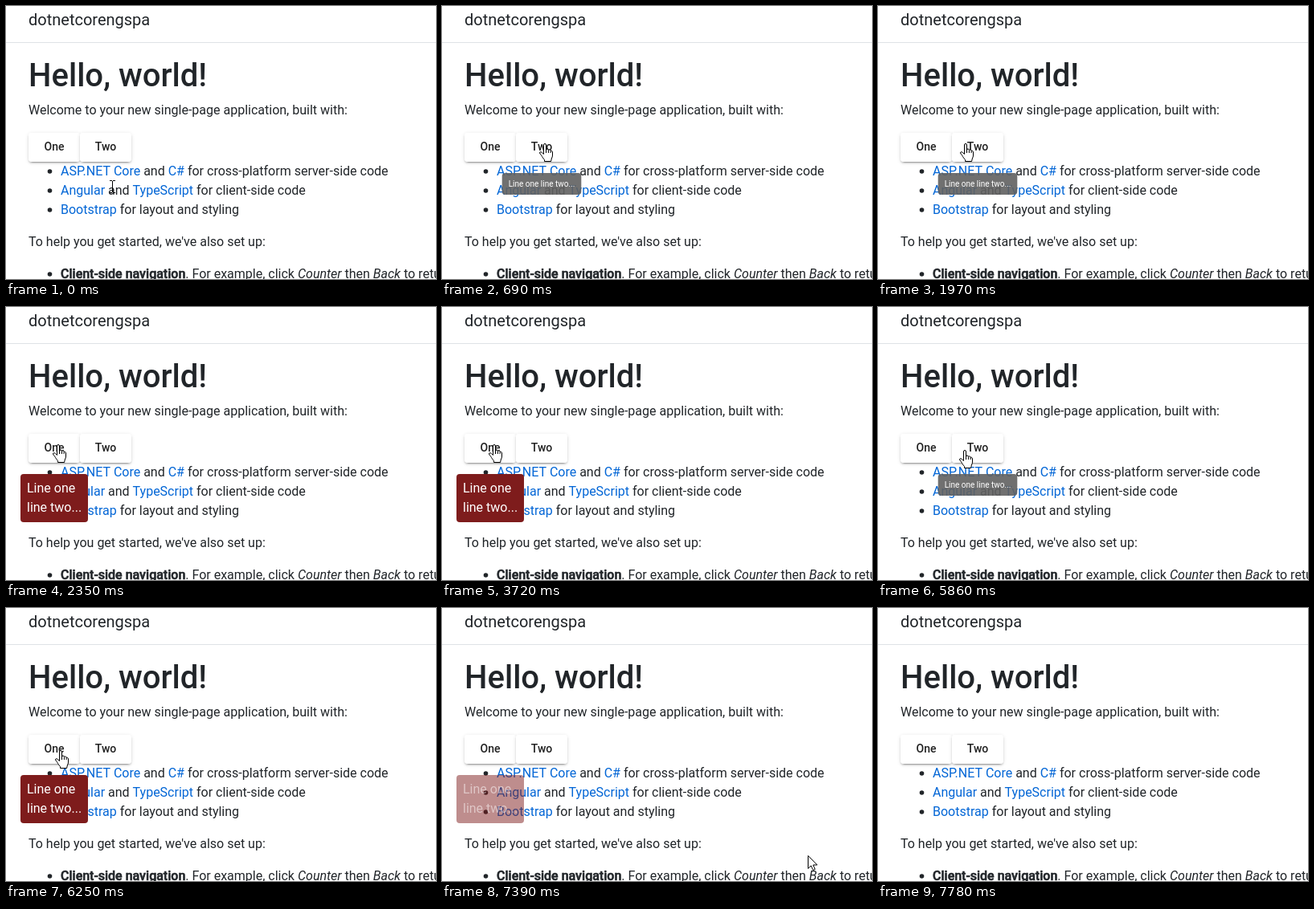
An HTML page with a canvas for the animation above (8.4 s loop, 535x340 px).

```html
<!DOCTYPE html>
<html lang="en">
<head>
<meta charset="utf-8">
<title>Tooltip demo</title>
<style>
  html, body { margin: 0; width: 100%; height: 100%; overflow: hidden; background: #fff; }
  canvas { display: block; }
</style>
</head>
<body>
<canvas id="stage" width="535" height="340"></canvas>
<script>
const ctx = document.getElementById('stage').getContext('2d');
const LOOP = 8400;
const INK = '#212529', LINK = '#0366d6', LINK_HOVER = '#0056b3';

// time, cursor kind, cursor left, cursor top, tooltip, tooltip opacity
const STEPS = [
  [0, 'beam', 128, 217],
  [120, 'hand', 126, 203],
  [270, 'hand', 123, 189],
  [390, 'hand', 122, 188, 'grey', 0.5],
  [540, 'hand', 121, 180, 'grey', 1],
  [690, 'hand', 121, 171, 'grey', 1],
  [1970, 'hand', 102, 171, 'grey', 1],
  [2090, 'hand', 86, 171, 'grey', 0.5],
  [2210, 'hand', 72, 171, 'red', 0.5],
  [2350, 'hand', 58, 171, 'red', 1],
  [2470, 'hand', 49, 171, 'red', 1],
  [3720, 'hand', 58, 171, 'red', 1],
  [3850, 'hand', 68, 170, 'red', 1],
  [3970, 'hand', 79, 170, 'red', 1],
  [4120, 'hand', 95, 173, 'red', 0.5],
  [4240, 'hand', 107, 176, 'grey', 0.5],
  [4360, 'hand', 114, 178, 'grey', 1],
  [5860, 'hand', 101, 178, 'grey', 1],
  [5980, 'hand', 86, 177, 'grey', 1],
  [6120, 'hand', 70, 177, 'red', 0.5],
  [6250, 'hand', 61, 177, 'red', 1],
  [7390, 'arrow', 455, 308, 'red', 0.5],
  [7540, 'beam', 489, 322],
  [7660, 'none', 0, 0]
];

const TIPS = {
  grey: { x: 74.7, w: 98.6, h: 27, fill: 'rgba(97,97,97,.9)', size: 10, base: 225, lines: ['Line one line two...'] },
  red: { x: 18, w: 84, h: 60, fill: '#7e1c1c', size: 16, base: 231, lines: ['Line one', 'line two...'] }
};

const HAND = new Path2D('M5.5 13.5V2Q5.5.5 7 .5T8.5 2V8Q8.7 7 10 7T11.4 8.4Q11.7 7.7 12.8 7.9T14.1 9.5' +
  'Q14.4 9 15.3 9.2T16.5 11V15Q16.5 17 15.3 19L14.6 22.5H6.5V20.5Q5 19 3.5 16.5Q2.5 14.5 1 13' +
  'Q0 11.8.9 11Q2 10.2 3.5 11.5Z');
const KNUCKLES = new Path2D('M8.5 7.5V12M11.4 8.4V12M14.1 9.5V12');
const ARROW = new Path2D('M.5.5V16.5L4.2 13L6.7 18.5L9.2 17.4L6.8 12H11.8Z');

function text(str, x, y, size = 16, color = INK, style = '') {
  ctx.font = `${style} ${size}px Roboto, sans-serif`;
  ctx.fillStyle = color;
  ctx.fillText(str, x, y);
  return x + ctx.measureText(str).width;
}

function flow(x, y, ...runs) {
  for (const [str, color, style] of runs) x = text(str, x, y, 16, color, style);
}

function box(x, y, w, h, r, fill) {
  ctx.beginPath();
  ctx.roundRect(x, y, w, h, r);
  ctx.fillStyle = fill;
  ctx.fill();
}

function bullet(y) {
  ctx.beginPath();
  ctx.arc(54.5, y, 2.8, 0, 7);
  ctx.fillStyle = INK;
  ctx.fill();
}

function button(label, x) {
  for (const [dy, blur, spread, alpha] of [[1, 5, 0, .12], [2, 2, 0, .14], [3, 1, -2, .2]]) {
    ctx.save();
    ctx.shadowColor = `rgba(0,0,0,${alpha})`;
    ctx.shadowBlur = blur;
    ctx.shadowOffsetY = dy;
    box(x - spread, 158 - spread, 64 + 2 * spread, 36 + 2 * spread, 4, '#fff');
    ctx.restore();
  }
  box(x, 158, 64, 36, 4, '#fff');
  ctx.textAlign = 'center';
  text(label, x + 32, 180, 14, 'rgba(0,0,0,.87)', '500');
  ctx.textAlign = 'left';
}

function page(hover) {
  ctx.fillStyle = '#fff';
  ctx.fillRect(0, 0, 535, 340);
  text('dotnetcorengspa', 28, 24, 20);
  ctx.fillStyle = '#dee2e6';
  ctx.fillRect(0, 45, 535, 1);
  text('Hello, world!', 28, 100, 40, INK, '500');
  text('Welcome to your new single-page application, built with:', 28, 135);
  button('One', 28);
  button('Two', 92);

  [206, 230, 254, 334].forEach(bullet);
  const linkColor = hover ? LINK_HOVER : LINK;
  flow(68, 211, ['ASP.NET Core', linkColor], [' and '], ['C#', LINK], [' for cross-platform server-side code']);
  if (hover) {
    ctx.fillStyle = linkColor;
    ctx.fillRect(68, 213, 99, 1);
  }
  flow(68, 235, ['Angular', LINK], [' and '], ['TypeScript', LINK], [' for client-side code']);
  flow(68, 259, ['Bootstrap', LINK], [' for layout and styling']);
  text("To help you get started, we've also set up:", 28, 299);

  const lead = 'Client-side navigation';
  const end = text(lead, 68, 339, 16, INK, '500');
  ctx.strokeStyle = INK;
  ctx.lineWidth = 0.6;
  ctx.strokeText(lead, 68, 339);
  flow(end, 339, ['. For example, click '], ['Counter', INK, 'italic'], [' then '],
    ['Back', INK, 'italic'], [' to return here.']);
}

function tooltip(name, alpha) {
  const tip = TIPS[name];
  ctx.globalAlpha = alpha;
  box(tip.x, 208, tip.w, tip.h, 4, tip.fill);
  tip.lines.forEach((line, i) => text(line, tip.x + 8, tip.base + 24 * i, tip.size, '#fff'));
  ctx.globalAlpha = 1;
}

function cursor(kind, x, y) {
  if (kind === 'none') return;
  ctx.save();
  ctx.translate(x, y);
  ctx.lineWidth = 1;
  ctx.strokeStyle = '#000';
  if (kind === 'beam') {
    ctx.fillStyle = '#000';
    ctx.fillRect(4, 1, 1, 14);
    for (const row of [0, 15]) {
      ctx.fillRect(1, row, 3, 1);
      ctx.fillRect(5, row, 3, 1);
    }
  } else {
    const shape = kind === 'hand' ? HAND : ARROW;
    ctx.fillStyle = '#fff';
    ctx.fill(shape);
    ctx.stroke(shape);
    if (kind === 'hand') ctx.stroke(KNUCKLES);
  }
  ctx.restore();
}

function draw(now) {
  const t = now % LOOP;
  const [start, kind, x, y, tip, alpha] = STEPS.findLast(step => step[0] <= t);
  page(start === 120);
  if (tip) tooltip(tip, alpha);
  cursor(kind, x, y);
}

const origin = performance.now();
function tick() {
  draw(performance.now() - origin);
  requestAnimationFrame(tick);
}
tick();
</script>
</body>
</html>
```
